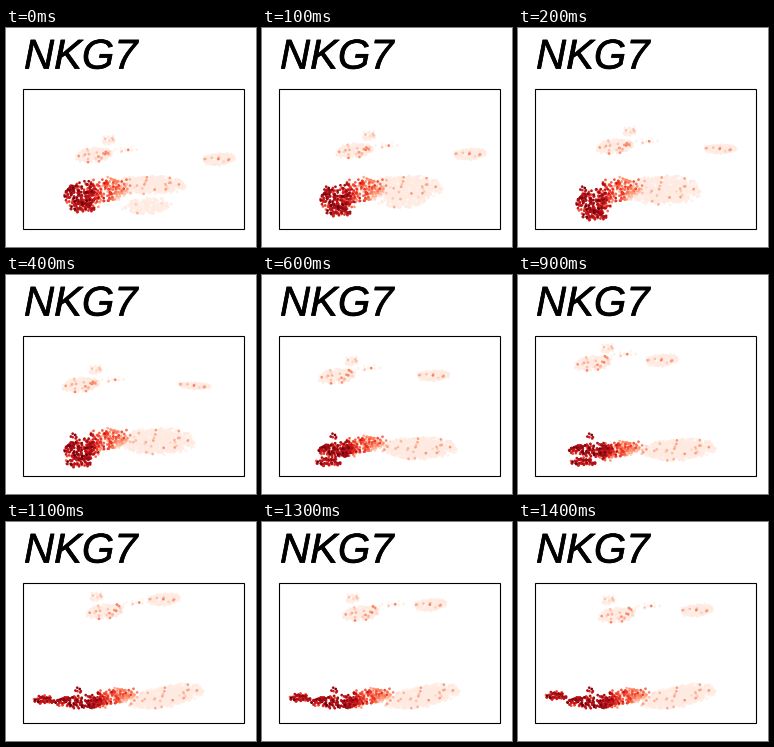
Write a matplotlib script that moves like this. It is 250x219 px and loops after 1500 ms.

```python
import numpy as np
import matplotlib.pyplot as plt
from matplotlib import patheffects
from matplotlib.animation import FuncAnimation
from matplotlib.patches import Rectangle

W, H, DPI = 250, 219, 100
# Pose time shown in each 100 ms step; repeats are holds
STEPS = [0, 1, 2, 2, 4, 5, 6, 7, 7, 9, 9, 11, 11, 12.5, 14]

rng = np.random.default_rng(7)


def ease(t, start, end):
    """Smooth step from 0 to 1 between two times."""
    x = np.clip((t - start) / (end - start), 0, 1)
    return x * x * (3 - 2 * x)


def disc(n, box=2.0, soft=0.07):
    """Points filling a superellipse; a larger box exponent squares it off."""
    a = rng.uniform(0, 2 * np.pi, n)
    c, s = np.cos(a), np.sin(a)
    edge = (np.abs(c) ** box + np.abs(s) ** box) ** (-1 / box)
    r = np.sqrt(rng.uniform(0, 1, n)) * edge * 0.97
    return np.c_[r * c, r * s] + rng.normal(0, soft, (n, 2))


def pale(pts, share, top=0.45):
    """Mostly background expression, with a share of stronger cells."""
    n = len(pts)
    hot = rng.random(n) < share
    return np.where(hot, rng.uniform(0.15, top, n), rng.uniform(0.01, 0.07, n))


def killer(pts):
    return np.clip(rng.normal(0.78, 0.1, len(pts)), 0.5, 1)


def mixed(pts):
    noise = rng.normal(0, 0.14, len(pts))
    return np.clip(0.48 - 0.2 * pts[:, 0] + noise, 0.08, 0.9)


# Each body gives centre x, centre y, radius x, radius y and tilt at time t

def helper(t):
    split = 1 - ease(t, 0, 2)
    return (143 + 18 * ease(t, 0, 8), 162 + 12 * ease(t, 2, 7) - 5 * split,
            36, 13 - 4 * ease(t, 2, 7) - 5 * split, 6 * ease(t, 8, 11))


def helper_lobe(t):
    x, y, _, _, tilt = helper(t)
    return x - 3, y + 4 + 17 * (1 - ease(t, 0, 2)), 23, 8, tilt / 2 + 1


def monocyte(t):
    x = 88 + 9 * ease(t, 0, 2) - 22 * ease(t, 2, 4) + 24 * ease(t, 9, 11)
    return x, max(127 - 4.3 * t, 77 + 1.15 * t), 18, 7, 2


def monocyte_bump(t):
    x, y, *_ = monocyte(t)
    return x + 14 - 23 * ease(t, 9, 11), y - 15, 6, 4, 0


def monocyte_trail(t):
    x, y, *_ = monocyte(t)
    return x + 26, y - 4 - 4 * ease(t, 4, 7), 18, 3, 3


def b_cell(t):
    x = max(213 - 4.5 * t - 0.4 * t * t, 81 + 7 * t)
    flat = ease(t, 0, 4) - ease(t, 4, 7)
    return x, max(131 - 5.1 * t, 37 + 3.65 * t), 15, 6 - 3 * flat, 1 - 2 * flat


def cytotoxic(t):
    return (100 + 7 * ease(t, 9, 11), 163 + 12 * ease(t, 2, 9),
            22, 11 - 4 * ease(t, 2, 7), 3)


def nk_cell(t):
    return (76, 167 + 8 * ease(t, 0, 2) + 5 * ease(t, 9, 11),
            17 + 9 * ease(t, 4, 11), 13 - 6.5 * ease(t, 2, 7), 0)


def nk_lobe(t):
    x, y, *_ = nk_cell(t)
    away = ease(t, 9, 11)
    return (x - 11 * ease(t, 2, 7) - 27 * away,
            y + 12 - 14 * away - 4 * ease(t, 11, 14),
            12 - 2 * away, 6 - 2 * ease(t, 4, 7), 0)


def nk_stray(t):
    return 66 + 7 * ease(t, 2, 7), 161 + 7 * ease(t, 9, 11), 4, 3, 0


clusters = []


def add(body, pts, color, **kw):
    clusters.append((body, pts, color(pts, **kw)))


add(helper, disc(760, 2.6), pale, share=0.03, top=0.38)
add(helper_lobe, disc(200), pale, share=0.02, top=0.3)
add(monocyte, disc(240, soft=0.1), pale, share=0.06)
add(monocyte_bump, disc(45, soft=0.2), pale, share=0.08, top=0.35)
add(monocyte_trail, disc(16, soft=0.1), pale, share=0.5)
add(b_cell, disc(200, soft=0.1), pale, share=0.05)
add(cytotoxic, disc(190, soft=0.2), mixed)
add(nk_cell, disc(180, 2.4, soft=0.1), killer)
add(nk_lobe, disc(60, soft=0.12), killer)
add(nk_stray, disc(6), killer)

values = np.concatenate([v for _, _, v in clusters])
order = np.argsort(values, kind="stable")


def positions(t):
    spots = []
    for body, pts, _ in clusters:
        cx, cy, rx, ry, tilt = body(t)
        u, v = pts.T
        spots.append(np.c_[cx + rx * u, cy + ry * v - tilt * u])
    return np.vstack(spots)[order]


fig = plt.figure(figsize=(W / DPI, H / DPI), dpi=DPI, facecolor="white")
ax = fig.add_axes([0, 0, 1, 1])
ax.set_xlim(0, W)
ax.set_ylim(H, 0)
ax.axis("off")

# A hairline outline gives the title its slightly heavier weight
ax.text(18, 40.6, "NKG7", fontsize=30, family="Liberation Sans",
        style="italic", va="baseline", ha="left",
        path_effects=[patheffects.withStroke(linewidth=0.5,
                                             foreground="black")])
start = positions(0)
cells = ax.scatter(start[:, 0], start[:, 1], s=3.8, c=values[order],
                   cmap="Reds", vmin=0, vmax=1, linewidths=0)
ax.add_patch(Rectangle((17, 60.5), 221, 140.5, fill=False,
                       edgecolor="black", linewidth=0.8, zorder=3))


def draw(i):
    cells.set_offsets(positions(STEPS[i]))
    return [cells]


anim = FuncAnimation(fig, draw, frames=len(STEPS), interval=100,
                     repeat=True, repeat_delay=0, blit=False)
plt.show()
```
